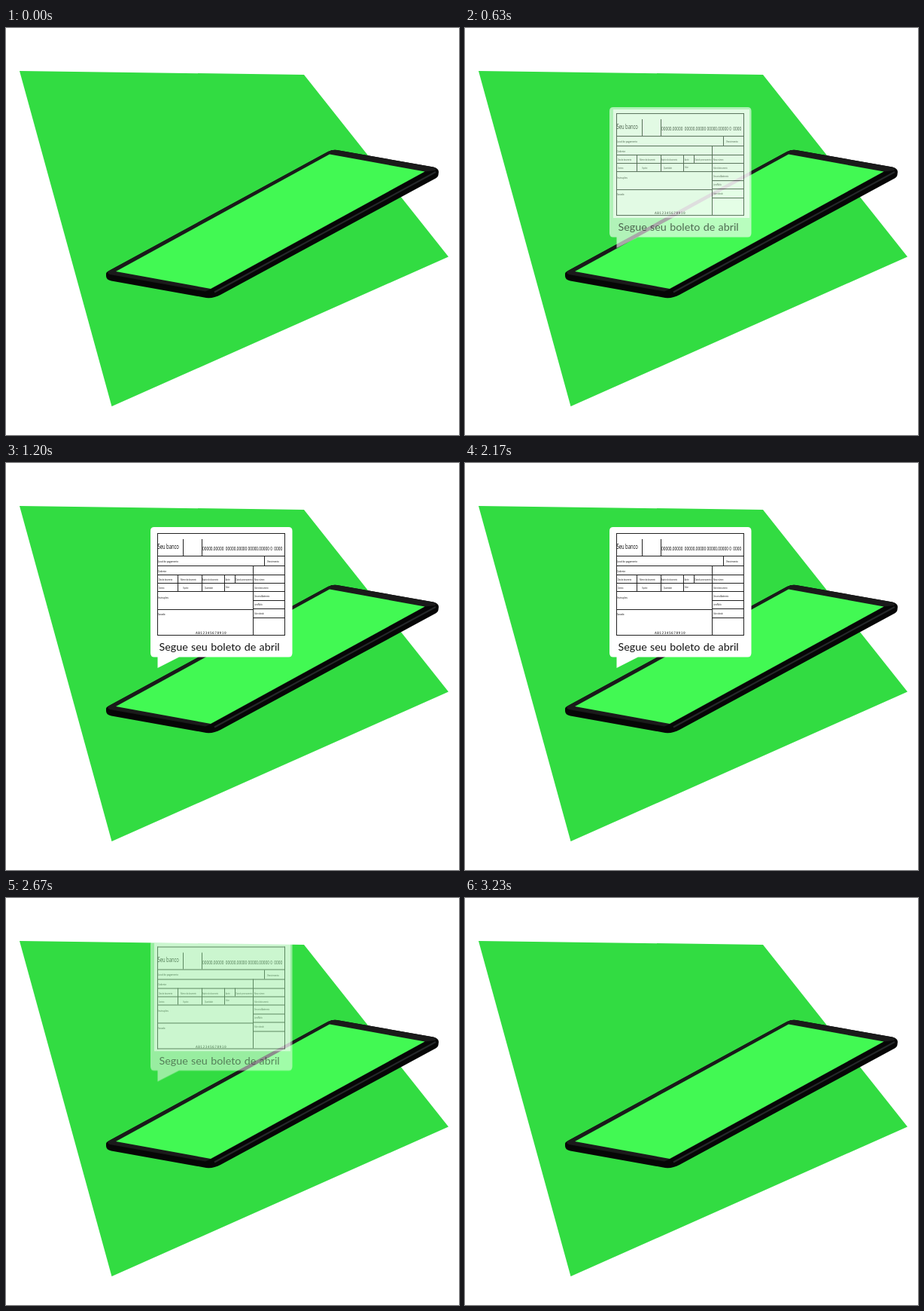
Recreate the animation shown at these times as an HTML page. Size 602 by 540 pixels, loop 4010 ms.

```html
<!DOCTYPE html>
<html lang="pt-BR">
<head>
<meta charset="utf-8">
<title>Boleto de abril</title>
<style>
  html, body { margin: 0; width: 100%; height: 100%; overflow: hidden; background: #fff; }
  svg { display: block; }

  .card { animation: rise 4010ms infinite; }
  .fade { animation: fade 4010ms infinite; }

  /* The card enters 462–729 ms and leaves 2529–2796 ms, at 30 pictures a second */
  @keyframes rise {
    0%, 11.521% { transform: translateY(53.5px); animation-timing-function: steps(8); }
    18.18%, 63.067% { transform: translateY(0); animation-timing-function: steps(8); }
    69.726%, 100% { transform: translateY(-57px); }
  }
  @keyframes fade {
    0%, 11.521% { opacity: 0; animation-timing-function: steps(8); }
    18.18%, 63.067% { opacity: 1; animation-timing-function: steps(8); }
    69.726%, 100% { opacity: 0; }
  }

  .message { font: 14.3px Lato, "Open Sans", sans-serif; word-spacing: .7px; fill: #111; }
  .labels { font-family: "Open Sans", "Noto Sans", sans-serif; fill: #000; }
  .serial { font: 4.5px "DejaVu Sans Mono", monospace; letter-spacing: .45px; fill: #111; }
</style>
</head>
<body>
<svg width="602" height="540" viewBox="0 0 602 540">
  <path fill="#32dc42" d="M18 57 396 62 588 303.500 140.500 502Z"/>

  <g class="phone">
    <path fill="#060606" d="M137 322 428 164Q434 161 440 162L568 184.500Q575 186 575 191L574.500 195Q574 198 570 200L285 354Q276 359 266 358L140 335.500Q133 334 133 329V326Q133 324 137 322Z"/>
    <path fill="#1a1a1a" d="M137 322 428 164Q434 161 440 162L568 184.500Q573 186 570 189L557 190.500 272 346.500 265 349.500 138 327Q133 325 137 322Z"/>
    <path fill="none" stroke="#25282a" stroke-width="2" d="M277 350.500 571 191"/>
    <path fill="#42f953" d="M146 323 430 167.500 556.500 190.500 272 346Z"/>
  </g>

  <g class="card">
    <path class="fade" fill="#fff" d="M197 85H375.500Q380.500 85 380.500 90V252Q380.500 257.500 375.500 257.500H230L201.500 272V257.500H197Q192 257.500 192 252V90Q192 85 197 85Z"/>
    <g class="fade">
      <path fill="#fff" d="M197 88H378V232H197Z"/>
      <path id="grid" fill="none" stroke="#222"/>
      <g id="labels" class="labels"></g>
      <text class="serial" x="252" y="227">AB12345678910</text>
    </g>
    <text class="message fade" x="203.500" y="249">Segue seu boleto de abril</text>
  </g>
</svg>
<script>
  const across = (y, x1 = 201, x2 = 371) => `M${x1} ${y}H${x2}`;
  const down = (x, y1, y2) => `M${x} ${y1}V${y2}`;

  document.getElementById('grid').setAttribute('d', [
    ...[93.5, 123.5, 136.5, 148.5, 159.5, 170.5, 228.5].map(y => across(y)),
    ...[182.5, 193.5, 205.5].map(y => across(y, 328.5)),
    across(194.5, 201, 328.5),
    down(201.5, 93, 229), down(370.5, 93, 229),
    down(235.5, 101, 123), down(260.5, 101, 123),
    down(343.5, 124, 136), down(328.5, 136, 228),
    ...[228.5, 260.5, 290.5].map(x => down(x, 148, 170)),
    down(304.5, 148, 159)
  ].join(''));

  // x, baseline, size, text
  const labels = [
    [201.5, 113.5, 8.6, 'Seu banco'],
    [261, 116, 7, '00000.00000\u00a0 00000.00000 00000.00000 0\u00a0 0000'],
    [202, 131.5, 4.2, 'Local do pagamento'],
    [347, 132, 4.2, 'Vencimento'],
    [202, 144.5, 4.2, 'Cedente'],
    [203, 156, 2.9, 'Data do documento'],
    [232, 156, 2.8, 'Número do documento'],
    [261, 156, 2.9, 'Espécie do documento'],
    [292, 156, 2.9, 'Aceite'],
    [305.5, 156, 2.9, 'Data do processamento'],
    [330, 156, 2.9, 'Nosso número'],
    [203, 167, 2.9, 'Carteira'],
    [235.5, 167, 2.9, 'Espécie'],
    [264, 167, 2.9, 'Quantidade'],
    [292, 165.5, 2.9, 'Valor'],
    [330, 167, 2.9, 'Valor do documento'],
    [330, 177.5, 2.9, 'Desconto/Abatimento'],
    [330, 188.5, 2.9, 'Juros/Multa'],
    [330, 200.5, 2.9, 'Valor cobrado'],
    [202, 179.5, 4.2, 'Instruções'],
    [202, 202, 4.2, 'Sacado']
  ];

  // The slip uses condensed lettering
  for (const [x, y, size, text] of labels) {
    const el = document.createElementNS('http://www.w3.org/2000/svg', 'text');
    el.setAttribute('transform', `translate(${x} ${y}) scale(.68 1)`);
    el.setAttribute('font-size', size);
    el.textContent = text;
    document.getElementById('labels').append(el);
  }
</script>
</body>
</html>
```
